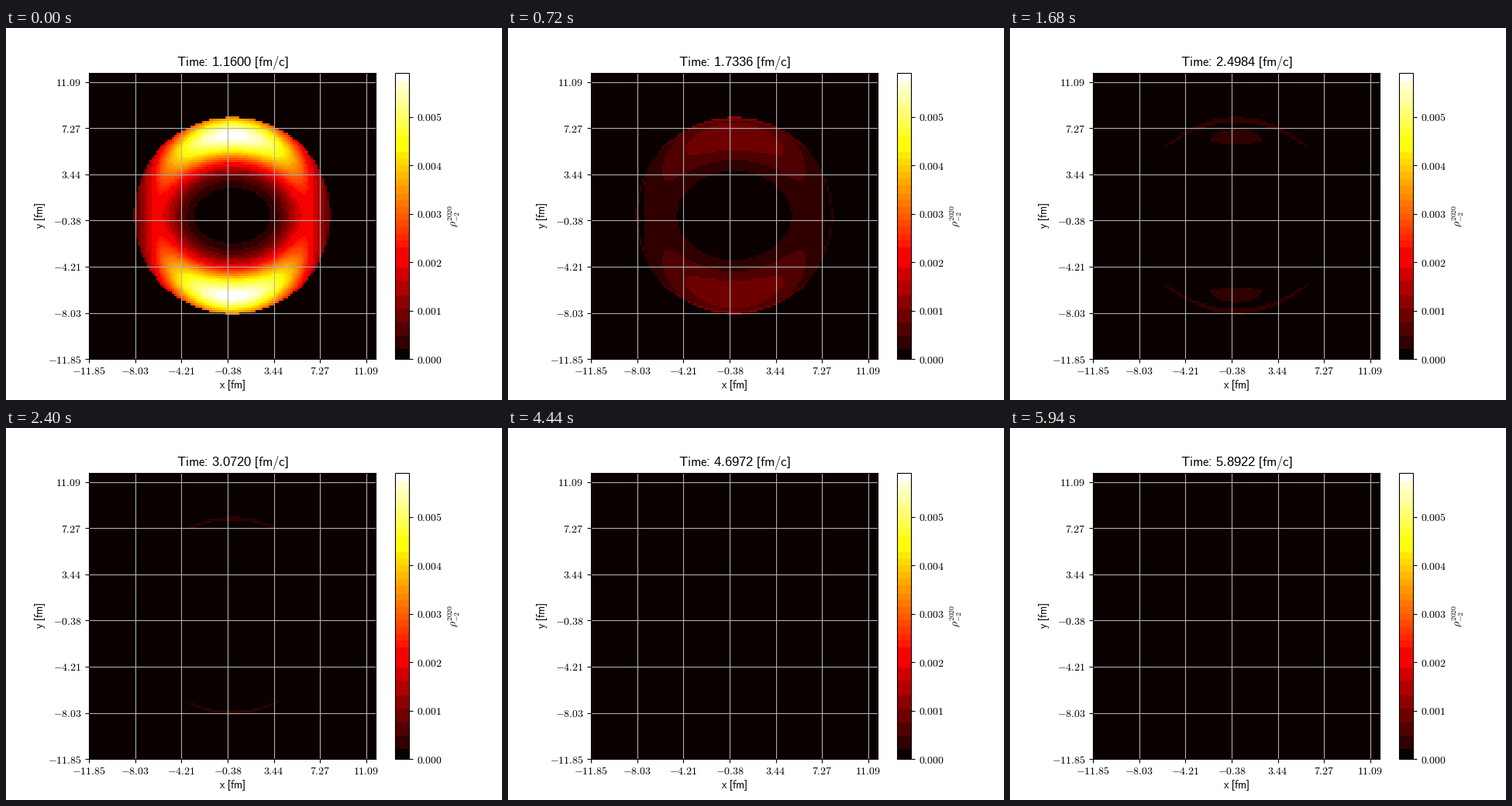
These frames come from a looping animation (640 px wide and 480 px high, 6 s). A matplotlib script:

```python
import numpy as np
import matplotlib.pyplot as plt
from matplotlib.animation import FuncAnimation
from matplotlib.colors import ListedColormap

plt.rcParams["mathtext.fontset"] = "cm"
plt.rcParams["font.family"] = "Liberation Sans"

FRAMES, INTERVAL = 100, 60
T0, DT = 1.16, 0.0478
N, CELL, STEP = 124, 2.981, 0.1912   # cells per side, pixels and fm per cell
EDGE = 42.6 * CELL                   # radius of the hot disc in pixels
VMAX = 0.005917


def banded_hot():
    """The hot map with coarse steps in each colour channel."""
    rgb = plt.get_cmap("hot")(np.arange(256))[:, :3]
    keys = (rgb * 255).astype(int) // [32, 16, 32]
    bands = np.empty_like(rgb)
    for key in np.unique(keys, axis=0):
        same = (keys == key).all(axis=1)
        bands[same] = rgb[same].mean(axis=0)
    bands[keys.sum(axis=1) == 0] = rgb[0]
    bands[keys[:, 2] == 7] = 1
    return ListedColormap(bands)


def bell(r, peak, inner, outer):
    """Gaussian with a different width on each side of its peak."""
    width = np.where(r < peak, inner, outer)
    return np.exp(-((r - peak) / width) ** 2 / 2)


offset = (np.arange(N) - (N - 1) / 2) * CELL
X, Y = np.meshgrid(offset, offset)
R = np.hypot(X, Y)
SIN2 = (Y / R) ** 2
shape = (bell(R, 104, 26.5, 21) * SIN2
         + 0.34 * bell(R, 96, 22, 20) * (1 - SIN2))
depth = np.clip(EDGE - 1.5 - R, 0, None)
rim = (0.22 + 0.78 * SIN2 ** 1.7) * np.exp(-depth / 6)


def density(t):
    bulk = VMAX * ((T0 - 0.2) / (t - 0.2)) ** 3.75 * shape
    shell = 0.00018 * (3.8 / t) ** 2.3 * rim
    return np.where(R < EDGE, np.maximum(bulk, shell), 0)


fig, ax = plt.subplots(figsize=(6.4, 4.8), dpi=100)
image = ax.imshow(density(T0), cmap=banded_hot(), vmin=0, vmax=VMAX,
                  origin="lower", extent=(0, N, 0, N), interpolation="nearest")
bar = fig.colorbar(image, ax=ax, ticks=np.arange(6) * 0.001, format="$%.3f$")
bar.set_label(r"$\rho_{-2}^{2020}$")

ticks = np.arange(0, N, 20)
labels = [f"${(k - N / 2) * STEP:.2f}$" for k in ticks]
ax.set_xticks(ticks, labels)
ax.set_yticks(ticks, labels)
ax.tick_params(axis="x", pad=2.8)
ax.set_xlabel(r"$\mathsf{x}$ [$\mathsf{fm}$]", labelpad=1.6)
ax.set_ylabel(r"$\mathsf{y}$ [$\mathsf{fm}$]", labelpad=0.5)
ax.grid(True)
title = ax.set_title("")


def update(i):
    t = T0 + DT * i
    image.set_data(density(t))
    title.set_text(rf"$\mathsf{{Time}}$: {t:.4f} [$\mathsf{{fm/c}}$]")
    return image, title


anim = FuncAnimation(fig, update, frames=FRAMES, interval=INTERVAL,
                     repeat=True, repeat_delay=0, blit=False)
plt.show()
```
